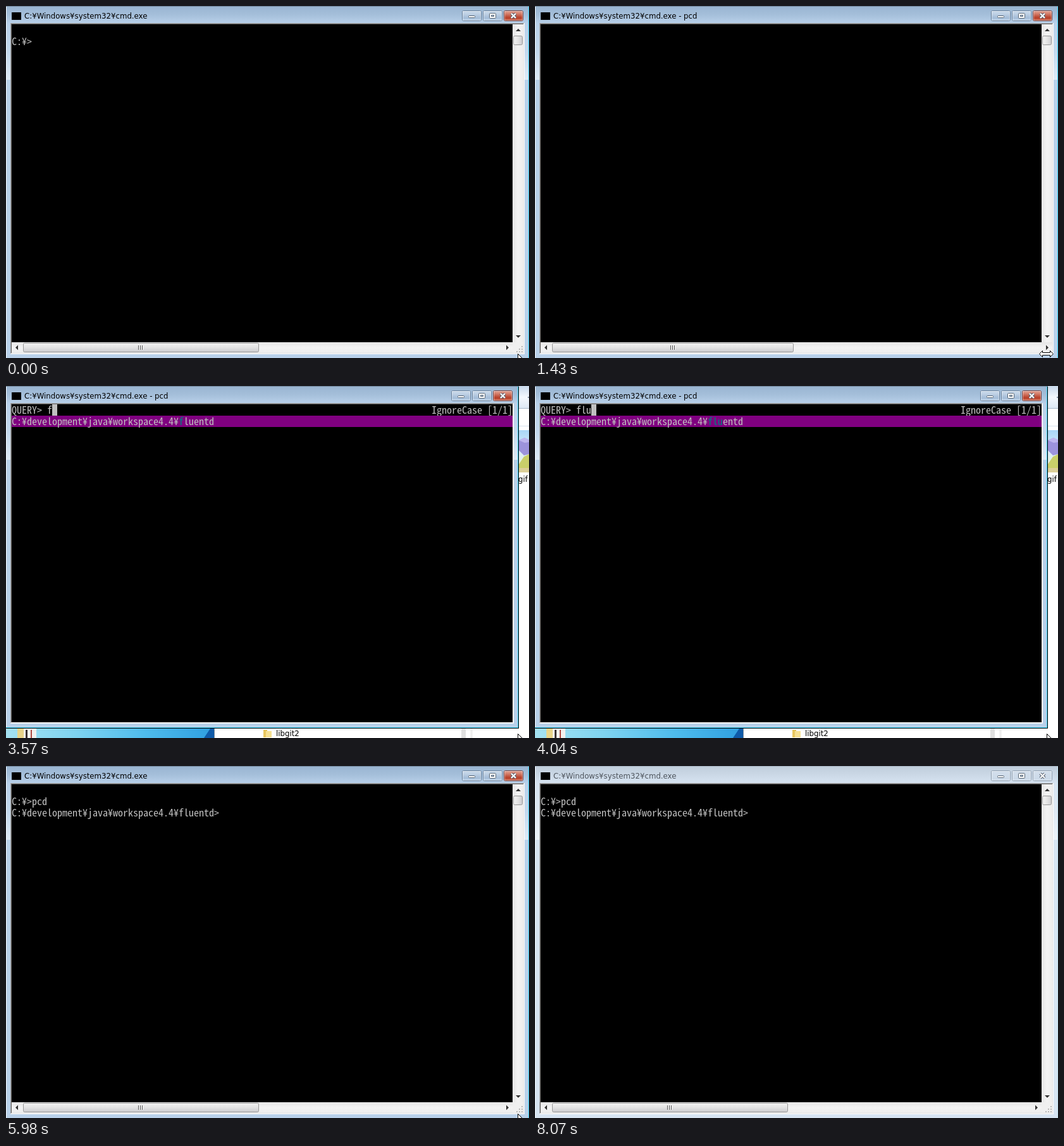
Recreate the animation shown at these times as an HTML page with a canvas. Size 827 by 558 pixels, loop 8090 ms.

```html
<!DOCTYPE html>
<html lang="en">
<head>
<meta charset="utf-8">
<title>Console directory picker</title>
<style>
html, body { margin: 0; width: 100%; height: 100%; overflow: hidden; background: #b9d1ea; }
canvas { display: block; }
</style>
</head>
<body>
<canvas id="stage" width="827" height="558"></canvas>
<script>
const ctx = document.getElementById('stage').getContext('2d');
const LOOP = 8090, CELL = 8, ROW = 18, LEFT = 9, TOP = 29;
const GRAY = '#c0c0c0', PURPLE = '#800080', TEAL = '#008080', CYAN = '#3fd6f8';
const MONO = '"Noto Sans Mono CJK JP", "Noto Sans Mono", "Liberation Mono", monospace';
const UI = '11.75px "DejaVu Sans", "Noto Sans", sans-serif';

ctx.font = `300 16px ${MONO}`;
const monoSize = Math.min(16, 16 * CELL / ctx.measureText('0').width);
const monoFont = `300 ${monoSize}px ${MONO}`;

const base = 'C:¥development¥';
const work = base + 'java¥workspace4.4';
const dirs = [
  base + 'WEB_DB_PRESS¥webdebpress-2014', base + 'gitrepository', work,
  work + '¥cool.io', work + '¥fluentd', work + '¥msgpack-jruby'
];

function rect(x, y, w, h, color) {
  ctx.fillStyle = color;
  ctx.fillRect(x, y, w, h);
}

function fade(x0, y0, x1, y1, ...colors) {
  const g = ctx.createLinearGradient(x0, y0, x1, y1);
  colors.forEach((c, i) => g.addColorStop(i / (colors.length - 1), c));
  return g;
}

function box(x, y, w, h, fill, stroke, r = 2) {
  ctx.beginPath();
  ctx.roundRect(x + .5, y + .5, w - 1, h - 1, r);
  ctx.fillStyle = fill;
  ctx.fill();
  ctx.strokeStyle = stroke;
  ctx.lineWidth = 1;
  ctx.stroke();
}

function poly(points, fill, stroke) {
  ctx.beginPath();
  points.forEach(([x, y]) => ctx.lineTo(x, y));
  ctx.closePath();
  ctx.fillStyle = fill;
  ctx.fill();
  if (stroke) {
    ctx.strokeStyle = stroke;
    ctx.lineWidth = 1;
    ctx.stroke();
  }
}

function label(text, x, y, color = '#000') {
  ctx.font = UI;
  ctx.textAlign = 'left';
  ctx.fillStyle = color;
  ctx.fillText(text, x, y);
}

// Console text sits on a fixed character grid.
function print(text, col, row, color = GRAY) {
  ctx.font = monoFont;
  ctx.textAlign = 'center';
  ctx.fillStyle = color;
  [...text].forEach((ch, i) =>
    ctx.fillText(ch, LEFT + (col + i + .5) * CELL, TOP + row * ROW + 15));
}

function caret(col, row) {
  rect(LEFT + col * CELL, TOP + row * ROW + 13, CELL, 5, GRAY);
}

function button(x, kind, active) {
  const red = kind === 'close' && active;
  const fill = red ? fade(0, 7, 0, 24, '#e6a797', '#d27a67', '#b9402a', '#cb6a51')
    : active ? fade(0, 7, 0, 24, '#cddcec', '#bed0e4', '#a5bdd8', '#b8d0e8')
    : fade(0, 7, 0, 24, '#d3dfec', '#cad8e8');
  box(x, 7, 31, 17, fill, red ? '#6e3a38' : active ? '#657d98' : '#8b9bad');
  ctx.strokeStyle = 'rgba(255,255,255,.45)';
  ctx.strokeRect(x + 1.5, 8.5, 28, 14);
  if (kind === 'min') box(x + 10, 15, 11, 4, '#fff', '#566473', 1);
  if (kind === 'max') {
    box(x + 10, 11, 11, 9, '#fff', '#566473', 1);
    box(x + 13, 14, 5, 3, '#b8cce2', '#566473', 0);
  }
  if (kind === 'close') {
    for (const [width, color] of [[4.4, '#566070'], [2.3, '#fff']]) {
      ctx.lineWidth = width;
      ctx.strokeStyle = color;
      ctx.beginPath();
      ctx.moveTo(x + 12, 12); ctx.lineTo(x + 19, 19);
      ctx.moveTo(x + 19, 12); ctx.lineTo(x + 12, 19);
      ctx.stroke();
    }
  }
}

function arrow(x, y, dx, dy) {
  poly([[x + dx * 2, y + dy * 2],
        [x - dx * 2 + dy * 4, y - dy * 2 + dx * 4],
        [x - dx * 2 - dy * 4, y - dy * 2 - dx * 4]], '#333');
}

function scrollbars(wide) {
  rect(801, 29, 17, 521, fade(801, 0, 818, 0, '#e6e6e6', '#f3f3f3', '#ededed'));
  rect(9, 533, 809, 17, fade(0, 533, 0, 550, '#e6e6e6', '#f3f3f3', '#ededed'));
  arrow(810, 38, 0, -1);
  arrow(810, 524, 0, 1);
  arrow(17, 541.5, -1, 0);
  arrow(wide ? 810 : 793, 541.5, 1, 0);
  box(802, 47, 15, 15, fade(802, 0, 817, 0, '#f4f4f4', '#e5e5e5', '#cbcbcf'), '#979797');
  const end = wide ? 409 : 400;
  box(27, 534, end - 27, 15, fade(0, 534, 0, 549, '#f4f4f4', '#e2e2e2', '#c9c9cd'), '#979797');
  const mid = wide ? 218 : 213;
  for (let i = -1; i < 2; i++) {
    rect(mid + i * 3 - 1, 538, 1, 7, '#555');
    rect(mid + i * 3, 538, 1, 7, '#f8f8f8');
  }
  if (!wide) {
    rect(801, 533, 17, 17, '#f0f0f0');
    for (let r = 0; r < 3; r++)
      for (let c = 2 - r; c < 3; c++) rect(807 + c * 4, 539 + r * 4, 2, 2, '#b8b8b8');
  }
}

// Two-pixel sunken edge around the client area.
function sunken(x, y, w, h) {
  rect(x, y, w, h, '#fff');
  rect(x, y, w - 1, h - 1, '#a0a0a0');
  rect(x + 1, y + 1, w - 2, h - 2, '#e3e3e3');
  rect(x + 1, y + 1, w - 3, h - 3, '#696969');
}

function frame(w, h, title, active) {
  const body = active ? '#b9d1ea' : '#d7e4f2';
  rect(0, 0, w, h, body);
  rect(0, 0, w, 28, active ? fade(0, 0, 0, 28, '#98b4d1', '#a5bfda', '#b9d1ea')
                           : fade(0, 0, 0, 28, '#bfcddb', '#cbd8e6', '#d7e4f2'));
  const streak = active ? fade(0, 28, 0, 117, '#b9d1ea', '#c4d9ee', '#dfebf7')
                        : fade(0, 28, 0, 117, '#d7e4f2', '#dfe9f4', '#edf3f9');
  rect(1, 28, 6, 89, streak);
  rect(w - 8, 28, 6, 89, streak);
  rect(0, 1, 1, h, '#eef5fc');
  rect(0, 0, w, 1, active ? '#6f8497' : '#a3b0bd');
  const edge = active ? CYAN : '#c4e4f2';
  rect(w - 2, 1, 1, h - 2, edge);
  rect(0, h - 2, w - 1, 1, edge);
  rect(w - 1, 1, 1, h - 1, '#000');
  rect(0, h - 1, w, 1, '#000');
  sunken(7, 27, w - 15, h - 35);
  rect(LEFT, TOP, 792, 504, '#000');
  rect(9, 10, 15, 12, '#000');
  label(title, 29, 20, active ? '#000' : '#4f565e');
  ['min', 'max', 'close'].forEach((kind, i) => button(w - 107 + i * 33, kind, active));
}

// The large window's right and bottom outline lies just outside the stage.
function fullWindow(title, active, wide) {
  frame(828, 560, title, active);
  scrollbars(wide);
}

// Desktop and folder view peeking out behind the smaller window.
function backdrop() {
  rect(0, 0, 827, 558, '#fff');
  rect(811, 0, 16, 36, fade(0, 0, 0, 36, '#c9daed', '#f4f8fd', '#dce7f4'));
  rect(811, 35, 16, 1, '#a9b9ca');
  rect(825, 17, 2, 2, '#8a9cae');
  rect(811, 63, 16, 1, '#d6e0ec');
  rect(811, 70, 16, 67, fade(0, 70, 0, 137, '#a9d6f6', '#dceffb', '#eef3cf'));
  poly([[811, 86], [820, 82], [827, 86], [827, 108], [819, 110], [811, 102]], '#9c93dc');
  poly([[811, 86], [820, 82], [827, 85], [827, 89], [820, 90]], '#bdb6ee');
  poly([[811, 124], [819, 112], [827, 108], [827, 130], [811, 130]], '#c9cf6a');
  rect(811, 130, 16, 7, '#dccf98');
  label('gif', 810, 152);
  rect(0, 543, 329, 15, fade(0, 0, 329, 0, '#a5e2f2', '#7fd3f0', '#4fbcec', '#2f9fe0'));
  poly([[313, 558], [323, 543], [329, 543], [329, 558]], '#0f5aa8');
  rect(18, 543, 11, 15, '#e9d58a');
  rect(28, 543, 20, 15, '#f3f1ee');
  rect(31, 545, 3, 13, '#3b3434');
  rect(39, 545, 2, 13, '#b04a42');
  rect(329, 543, 1, 15, '#7c8c9c');
  rect(407, 545, 6, 12, '#e8c65e');
  rect(411, 547, 9, 10, '#f5df91');
  label('libgit2', 427, 555);
  rect(720, 543, 7, 15, '#e0e0e0');
  rect(735, 543, 1, 15, '#dcdcdc');
  rect(737, 543, 1, 15, '#ececec');
}

function pickerWindow(query) {
  backdrop();
  frame(811, 543, 'C:¥Windows¥system32¥cmd.exe - pcd', true);
  print('QUERY> ' + query, 0, 0);
  rect(LEFT + (7 + query.length) * CELL, TOP, CELL, ROW, GRAY);
  print('IgnoreCase [1/1]', 83, 0);
  rect(LEFT, TOP + ROW, 792, ROW, PURPLE);
  if (!query) {
    dirs.forEach((dir, i) => print(dir, 0, i + 1));
    return;
  }
  const hit = dirs.find(dir => dir.includes(query));
  const at = hit.indexOf(query), end = at + query.length;
  print(hit.slice(0, at), 0, 1);
  print(query, at, 1, TEAL);
  print(hit.slice(end), end, 1);
}

function pointer() {
  poly([[809.5, 551.5], [809.5, 565], [820, 562]], '#fff', '#000');
}

function resizePointer() {
  poly([[797.5, 551.5], [802.5, 546.5], [802.5, 549.5], [814.5, 549.5], [814.5, 546.5],
        [819.5, 551.5], [814.5, 556.5], [814.5, 553.5], [802.5, 553.5], [802.5, 556.5]],
       '#fff', '#000');
}

function draw(t) {
  const title = 'C:¥Windows¥system32¥cmd.exe';
  if (t < 1430) {
    const typed = t < 720 ? '' : t < 980 ? 'p' : t < 1130 ? 'pc' : 'pcd';
    fullWindow(title, true, false);
    print('C:¥>' + typed, 0, 1);
    if ((t >= 150 && t < 980) || t >= 1280) caret(4 + typed.length, 1);
    pointer();
  } else if (t < 1560) {
    fullWindow(title + ' - pcd', true, true);
    resizePointer();
  } else if (t < 4460) {
    pickerWindow(t < 3570 ? '' : t < 3880 ? 'f' : t < 4040 ? 'fl' : 'flu');
    pointer();
  } else {
    fullWindow(title, t < 8070, false);
    print('C:¥>pcd', 0, 1);
    print(work + '¥fluentd>', 0, 2);
    const on = (t >= 5420 && t < 5980) || (t >= 6410 && t < 7030) || (t >= 7500 && t < 8070);
    if (on) caret(41, 2);
    if (t < 7640) pointer();
  }
}

const start = performance.now();
function tick() {
  draw((performance.now() - start) % LOOP);
  requestAnimationFrame(tick);
}
tick();
</script>
</body>
</html>
```
